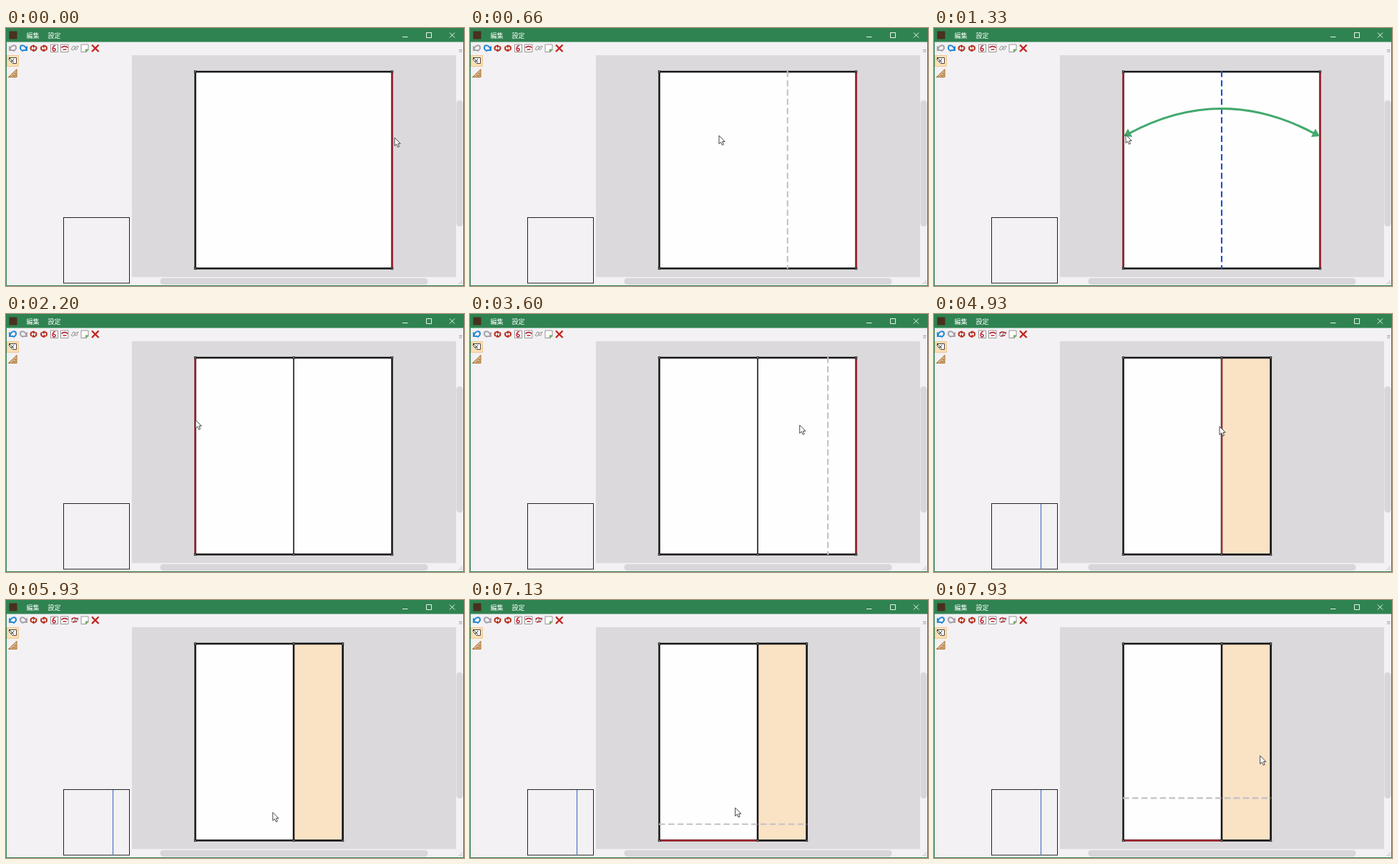
Write an HTML page that moves like this. It is 640 by 360 pixels and loops after 8 s.

```html
<!DOCTYPE html>
<html lang="ja">
<head>
<meta charset="utf-8">
<title>Paper folding</title>
<style>
html, body { margin: 0; width: 100%; height: 100%; overflow: hidden; background: #f3f1f3; }
svg { display: block; width: 640px; height: 360px; }
text { font: 500 9px "Noto Sans CJK JP", "Noto Sans CJK", sans-serif; fill: #fff; }
.line { fill: none; stroke: #151515; stroke-width: 2.5; }
.red { fill: none; stroke: #b91f2d; stroke-width: 2; }
.dash { fill: none; stroke: #c4c1c6; stroke-width: 2.1; stroke-dasharray: 8.6 4.3; }
.blue { stroke: #1b50cc; }
.arc { fill: none; stroke: #43a96d; stroke-width: 3; }
.head { fill: #43a96d; }
.handle { fill: #aaa; stroke: #222; stroke-width: 1; }
.icon { fill: none; stroke-width: 2; }
.page { fill: #fff; stroke: #8b8b8b; stroke-width: .9; }
</style>
</head>
<body>
<svg viewBox="0 0 640 360">
  <defs>
    <path id="undo" d="M5.5 31C6 24 13 22.500 14 26.500C14.600 29 12.500 31 10 32.500M5 25.500V31H10.500"/>
    <g id="turn">
      <path d="M35.500 31C33 27 36 24 39 25.500M41.500 25.500C44 29 41 32.500 38 31"/>
      <path d="M38 23L41.500 25.500 38 28ZM39 28.500L35.500 31 39 33.500Z" fill="#b5301f" stroke="none"/>
    </g>
  </defs>

  <rect width="640" height="360" fill="#f3f1f3"/>
  <rect x="176" y="38" width="453" height="309.500" fill="#dbd9dc"/>
  <rect x="629.500" y="101" width="9" height="176" rx="4.500" fill="#d8d6da"/>
  <rect x="215.500" y="349" width="374" height="9" rx="4.500" fill="#d8d6da"/>
  <path d="M633 30.500h4.500M633 33h4.500" stroke="#888" stroke-width=".8"/>
  <path d="M637 352v1M635 354v1M637 354v1M633 356v1M635 356v1M637 356v1" stroke="#aaa"/>
  <path d="M0.500 0V359.500H639.500V0" fill="none" stroke="#2f8052"/>
  <rect width="640" height="19.500" fill="#2f8351"/>
  <rect x="4.500" y="4.500" width="11" height="11" fill="#49301f"/>
  <text x="28.500" y="13.500">編集</text>
  <text x="58.500" y="13.500">設定</text>
  <path d="M554 12.500h7.500M587.500 6.500h7v7h-7ZM620 6.500l7 7M627 6.500l-7 7" fill="none" stroke="#fff" stroke-width=".9"/>

  <g class="icon">
    <use href="#undo" id="undoIcon"/>
    <use href="#undo" id="redoIcon" transform="matrix(-1 0 0 1 34 0)"/>
    <g stroke="#b5301f">
      <use href="#turn"/>
      <use href="#turn" transform="matrix(-1 0 0 1 91.500 0)"/>
    </g>
    <path class="page" d="M62.500 23h10v10.500h-10ZM76.500 23h10.500v10.500h-10.500ZM105 23h10v7.500l-3 3h-7Z"/>
    <path d="M69 24.500C64 25 64.500 32 67 32C70 32 70 27.500 66 28.500" stroke="#b92332" stroke-width="1.500"/>
    <path d="M77.500 27.500C80 25 84 25 86.500 27.500M79.500 30h5" stroke="#b92332" stroke-width="1.600"/>
    <path d="M112 33.500v-3h3" stroke="#79a45c"/>
    <path d="M91 30l3-5 3 1-3 5ZM96 30l2-4 3-1-2 5Z" fill="#eee" stroke="#888" stroke-width=".8"/>
    <path id="flipIcon" d="M91.500 27C94 24 98 25 101 27M93 31l6-1" stroke="#b92332" stroke-width="1.500"/>
    <path d="M120 23.500l9.500 9.500M129.500 23.500l-9.500 9.500" stroke="#c3211d" stroke-width="2.300"/>
  </g>
  <rect x="1.500" y="38.500" width="16" height="15" fill="#fbdfb7" stroke="#f2bf7d" stroke-width=".8"/>
  <path d="M4.500 41.500h10v8h-5l-5-5Z" fill="#fff" stroke="#333" stroke-width=".9"/>
  <path d="M4 41l7 7M7 46c1 1 3 0 4-3" fill="none" stroke="#333"/>
  <path d="M3.500 68.500H15V57.500ZM9 66.500h4v-4Z" fill="#edbd7c" fill-rule="evenodd" stroke="#925b25" stroke-width=".9"/>

  <rect x="80.500" y="264.500" width="92" height="91.500" fill="none" stroke="#222"/>
  <path id="mapCrease" d="M149.500 265V355.500" stroke="#4d72c9" stroke-width="1.200"/>

  <g id="flat">
    <rect class="line" x="264.500" y="61" width="275" height="274.500" style="fill:#fefefe"/>
    <path id="crease" class="line" d="M402 61V335.500" style="stroke-width:1.600"/>
  </g>
  <g id="folded">
    <rect class="line" x="264.500" y="61" width="206" height="274.500" style="fill:#fefefe"/>
    <rect class="line" x="402" y="61" width="68.500" height="274.500" style="fill:#fae2c5"/>
  </g>
  <path id="redRight" class="red" d="M539.500 62V335"/>
  <path id="redLeft" class="red" d="M264.500 62V335"/>
  <path id="redMid" class="red" d="M402 62V335"/>
  <path id="redBottom" class="red" d="M265.500 335.500H401"/>
  <g id="handles"></g>
  <path id="guide" class="dash"/>
  <g id="snapA"><path class="dash blue" d="M402 60V336"/></g>
  <g id="snapB"><path class="dash blue" d="M470.500 60V336"/></g>
  <path id="cursor" d="M0 0V11.500L2.600 9 4.500 13.200 6.500 12.300 4.700 8.300H8.200Z" fill="#fff" stroke="#333" stroke-width=".9"/>
</svg>
<script>
const $ = id => document.getElementById(id);
const LOOP = 8000, RIGHT = 539.5, BOTTOM = 335.5;
const FIRST_FOLD = 1750, SECOND_FOLD = 4600;

// Cursor stops: time, x, y
const stops = [
  [0, 543, 153], [200, 543, 153], [850, 268, 149], [1750, 268, 149],
  [2000, 265, 148], [2250, 265, 148], [2600, 543, 156], [3380, 543, 157],
  [3460, 531, 157], [3600, 461, 155], [3800, 399, 157], [5230, 399, 157],
  [6060, 368, 322], [6150, 366, 334], [6930, 366, 334],
  [7000, 367, 320], [7130, 370.5, 290], [8000, 463, 211]
];

// Visible time spans
const spans = {
  flat: [[0, SECOND_FOLD]],
  folded: [[SECOND_FOLD, LOOP]],
  mapCrease: [[SECOND_FOLD, LOOP]],
  flipIcon: [[SECOND_FOLD, LOOP]],
  crease: [[FIRST_FOLD, SECOND_FOLD]],
  redRight: [[0, FIRST_FOLD], [2660, SECOND_FOLD]],
  redLeft: [[850, 2260]],
  redMid: [[3800, 5300]],
  redBottom: [[6120, LOOP]],
  snapA: [[850, FIRST_FOLD]],
  snapB: [[3800, SECOND_FOLD]],
  guide: [[200, 850], [3440, 3800], [6940, LOOP]]
};

function addArrow(id, x1, x2, y) {
  const rise = (x2 - x1) * .27, mid = (x1 + x2) / 2;
  const head = (x, s) =>
    `<path class="head" d="M${x} ${y}l${12 * s} 1l${-6 * s} -11.500Z"/>`;
  $(id).innerHTML +=
    `<path class="arc" d="M${x1 + 6} ${y - 3}Q${mid} ${y - rise} ${x2 - 6} ${y - 3}"/>` +
    head(x1, 1) + head(x2, -1);
}
addArrow("snapA", 265, 539, 151);
addArrow("snapB", 402.5, 539, 157);

function addHandles(id, xs) {
  for (const x of xs) for (const y of [61, BOTTOM])
    $(id).innerHTML += `<rect class="handle" x="${x - 1.2}" y="${y - 1.2}" width="2.400" height="2.400"/>`;
}

let handleKey = "";
function updateHandles(t) {
  const xs = t < FIRST_FOLD ? [264.5, RIGHT]
    : [264.5, 402, t < SECOND_FOLD ? RIGHT : 470.5];
  if (handleKey === xs.join()) return;
  handleKey = xs.join();
  $("handles").innerHTML = "";
  addHandles("handles", xs);
}

function cursorAt(t) {
  const i = stops.findIndex(s => s[0] > t);
  const [t0, x0, y0] = stops[i - 1], [t1, x1, y1] = stops[i];
  const p = (t - t0) / (t1 - t0);
  return [x0 + (x1 - x0) * p, y0 + (y1 - y0) * p];
}

function draw(t) {
  for (const id in spans) {
    const on = spans[id].some(([a, b]) => t >= a && t < b);
    $(id).style.display = on ? "" : "none";
  }
  const [x, y] = cursorAt(t);
  $("cursor").setAttribute("transform", `translate(${x} ${y})`);
  // The fold line lies halfway between the grabbed edge and the cursor
  $("guide").setAttribute("d", t < SECOND_FOLD
    ? `M${(RIGHT + x) / 2} 60V336`
    : `M264 ${(BOTTOM + y) / 2}H471`);
  const done = t >= FIRST_FOLD;
  $("undoIcon").setAttribute("stroke", done ? "#2488d8" : "#a5a3a8");
  $("redoIcon").setAttribute("stroke", done ? "#a5a3a8" : "#2488d8");
  updateHandles(t);
}

const start = performance.now();
function tick() {
  draw((performance.now() - start) % LOOP);
  requestAnimationFrame(tick);
}
tick();
</script>
</body>
</html>
```
